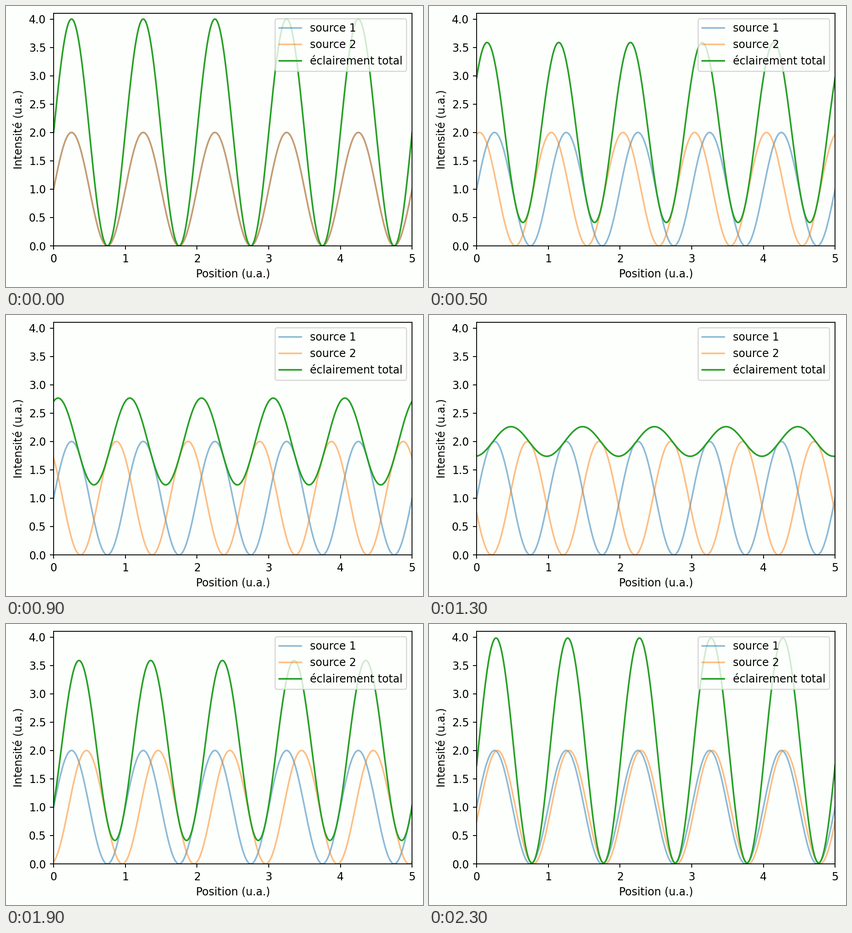
Write a matplotlib script that moves like this. It is 911 by 615 pixels and loops after 2400 ms.

```python
import numpy as np
import matplotlib.pyplot as plt
from matplotlib.animation import FuncAnimation

W, H, DPI = 911, 615, 170
FRAMES, INTERVAL = 24, 100
PAPER = "#fdfffc"

plt.rcParams.update({"font.family": "DejaVu Sans", "font.size": 10})

# The tiny margin keeps the pixel size from rounding down
fig = plt.figure(figsize=((W + 1e-6) / DPI, (H + 1e-6) / DPI), dpi=DPI, facecolor=PAPER)

left, right, top, bottom = 104, 887.2, 16.2, 525
ax = fig.add_axes(
    [left / W, 1 - bottom / H, (right - left) / W, (bottom - top) / H],
    facecolor=PAPER,
)
ax.set(xlim=(0, 5), ylim=(0, 4.1), xlabel="Position (u.a.)", ylabel="Intensité (u.a.)")
ax.set_xticks(range(6))
ax.set_yticks(np.arange(0, 4.1, 0.5))

x = np.linspace(0, 5, 1000)


def wave(phase=0.0):
    return 1 + np.sin(2 * np.pi * x + phase)


fixed = wave()
ax.plot(x, fixed, color="C0", alpha=0.5, label="source 1")
moving, = ax.plot(x, fixed, color="C1", alpha=0.5, label="source 2")
total, = ax.plot(x, 2 * fixed, color="#26a026", label="éclairement total")
ax.legend(loc="upper right", facecolor=PAPER)


def update(i):
    shifted = wave(2 * np.pi * i / FRAMES)
    moving.set_ydata(shifted)
    total.set_ydata(fixed + shifted)
    return moving, total


anim = FuncAnimation(fig, update, frames=FRAMES, interval=INTERVAL, repeat=True, repeat_delay=0)
plt.show()
```
